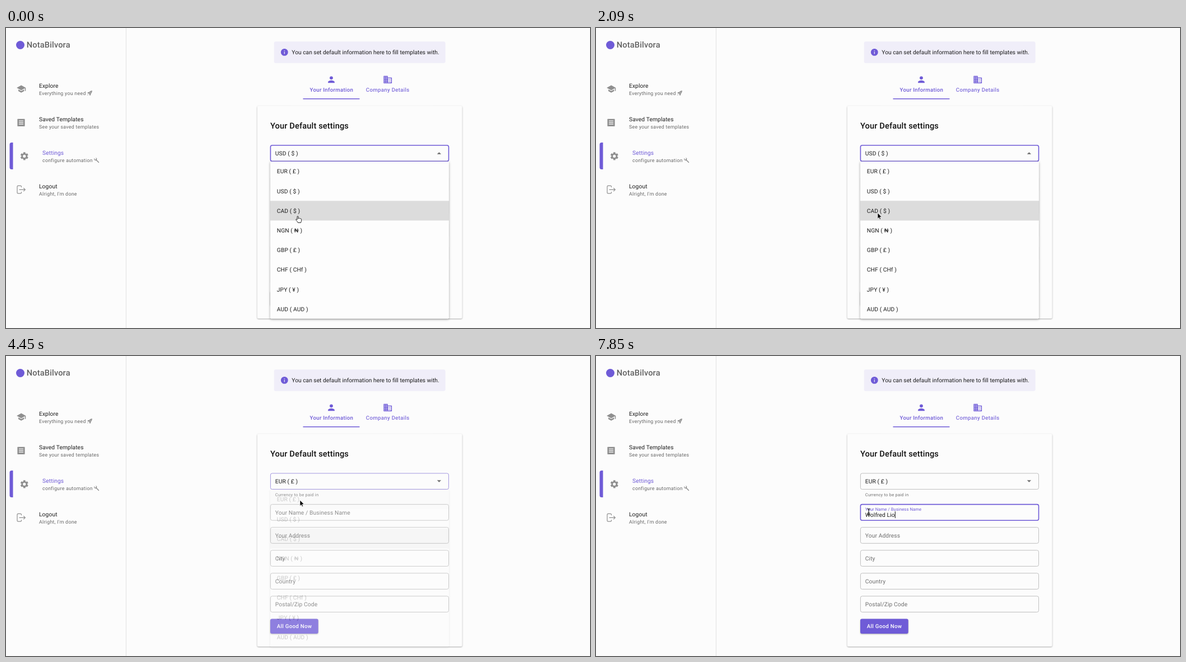
Animation of 1043 by 537 pixels, one loop 8000 ms. Source, as an HTML page:

```html
<!DOCTYPE html>
<html lang="en">
<head>
<meta charset="utf-8">
<title>Default settings</title>
<style>
  html, body { margin: 0; width: 100%; height: 100%; overflow: hidden; background: #fcfcfc; }
  svg { display: block; width: 100%; height: 100%; }
  text { font-family: Roboto, sans-serif; text-rendering: geometricPrecision; white-space: pre; }
  .sys text { font-family: Inter, sans-serif; }
  .card { filter: drop-shadow(0 1px 1.2px rgba(0,0,0,.32)); }
  .btn { filter: drop-shadow(0 1.2px 1.2px rgba(0,0,0,.3)); }
  .pop { filter: drop-shadow(0 1.5px 2px rgba(0,0,0,.34)); }
</style>
</head>
<body>
<svg id="stage" viewBox="0 0 1043 537"></svg>
<script>
const LOOP = 8000, TICK = 148.2;
const PURPLE = '#6f5bd7', INK = '#1c1c1c', GREY = '#6e6e6e', ICON = '#8f8f8f', PAPER = '#fcfcfc';
const ROW = 35.2, MENU_TOP = 239;

// Type styles: size, letter spacing, weight
const BODY = [10.27, .096, 400], NOTE = [8.8, .293, 400], BUTTON = [9.73, .278, 500],
      TITLE = [14.67, .11, 500], HELP = [7.5, .24, 400], INFO = [10.27, 0, 400],
      ENTRY = [9.3, 0, 600], ADDRESS = [8.8, 0, 400], MANAGE = [9.3, 0, 400];

const text = (x, y, str, [size, gap, weight], fill = INK, extra = '') =>
  `<text x="${x}" y="${y}" font-size="${size}" letter-spacing="${gap}" font-weight="${weight}" fill="${fill}" ${extra}>${str}</text>`;
const rect = (x, y, w, h, r, fill, extra = '') =>
  `<rect x="${x}" y="${y}" width="${w}" height="${h}" rx="${r}" fill="${fill}" ${extra}/>`;
const icon = (cx, cy, body, fill, scale = .733) =>
  `<g transform="translate(${cx} ${cy}) scale(${scale}) translate(-12 -12)" fill="${fill}">${body}</g>`;
const path = (d, extra = '') => `<path d="${d}" ${extra}/>`;
const field = (y, id = '') =>
  rect(472.4, y, 318.2, 28.6, 3, 'none', `stroke="#bfbfbf" ${id && `id="${id}"`}`);

const tooth = a => path('M12 2.4V21.6', `stroke="${ICON}" stroke-width="5" transform="rotate(${a} 12 12)"`);
const school = path('M5 13.18v4L12 21l7-3.82v-4L12 17l-7-3.82zM12 3L1 9l11 6 9-4.91V17h2V9L12 3z');
const sheet = path('M4 3h16a1 1 0 0 1 1 1v16a1 1 0 0 1-1 1H4a1 1 0 0 1-1-1V4a1 1 0 0 1 1-1z') +
  path('M6.5 8h11M6.5 12h11M6.5 16h11', `stroke="${PAPER}" stroke-width="1.7"`);
const gear = [0, 60, 120].map(tooth).join('') +
  `<circle cx="12" cy="12" r="7.2"/><circle cx="12" cy="12" r="3.5" fill="${PAPER}"/>`;
const person = path('M12 12a4 4 0 1 0 0-8 4 4 0 0 0 0 8zm0 2c-2.67 0-8 1.34-8 4v2h16v-2c0-2.66-5.33-4-8-4z');
const pane = (x, y) => `M${x} ${y}h2v2h-2z`;
const office = path('M12 7V3H2v18h20V7H12zM12 9h8v10h-8v-2h2v-2h-2v-2h2v-2h-2z' +
  [5, 9, 13, 17].map(y => pane(4, y) + pane(8, y)).join('') + pane(16, 11) + pane(16, 15), 'fill-rule="evenodd"');
const info = path('M12 2a10 10 0 1 0 0 20 10 10 0 0 0 0-20zM11 11h2v6h-2zM11 7h2v2h-2z', 'fill-rule="evenodd"');

function sidebar() {
  const item = (x, y, name, note, fill) => text(x, y, name, BODY, fill) + text(x, y + 13.3, note, NOTE, '#666');
  return path('M214.5 0V537', 'stroke="#e2e2e2"') +
    `<circle cx="25.5" cy="30.5" r="7.5" fill="${PURPLE}"/>` +
    text(36.8, 34.7, 'NotaBilvora', TITLE, '#626262') +
    icon(27.2, 109.2, school, ICON) + icon(27, 169.3, sheet, ICON) + icon(32.8, 229.4, gear, ICON) +
    path('M27.5 285.3V284q0-1.6-1.6-1.6H21.600q-1.600 0-1.600 1.600v10.600q0 1.600 1.600 1.600h4.300q1.600 0 1.600-1.600v-1.300M23.500 289.300h10.500M31.300 286.300l3 3-3 3',
      `fill="none" stroke="${ICON}" stroke-width="1.2"`) +
    path('M12.500 205V253H10Q6.500 253 6.500 249.500V208.500Q6.500 205 10 205z', `fill="${PURPLE}"`) +
    item(59, 106.500, 'Explore', 'Everything you need') +
    item(59, 166.600, 'Saved Templates', 'See your saved templates') +
    item(65, 226.700, 'Settings', 'configure automation', PURPLE) +
    item(59, 286.800, 'Logout', "Alright, I'm done") +
    path('M153.500 112.500q-4 .2-6 4l2.500 2.200q3.300-2.200 3.500-6.200zM147.700 115l-2 1.300 1.600.6zM151 118l-.8 2.700-1-1.600zM147 118.500l-1.300 2',
      'fill="#aaa" stroke="#777" stroke-width=".7"') +
    path('M160.500 235.500l5 5', 'stroke="#8a8a8a" stroke-width="1.4" stroke-linecap="round"') +
    path('M158.200 233.500a2 2 0 1 0 2.300-.8', 'fill="none" stroke="#8a8a8a" stroke-width="1.1"');
}

function page() {
  const labels = ['Your Address', 'City', 'Country', 'Postal/Zip Code'];
  return rect(478.7, 24.3, 306, 38.4, 3, '#f0eef9') + icon(497.3, 43.4, info, PURPLE, .64) +
    text(510.3, 47.1, 'You can set default information here to fill templates with.', INFO) +
    icon(581, 92.3, person, PURPLE) + icon(681.8, 92.3, office, PURPLE) +
    text(542.5, 113.8, 'Your Information', BUTTON, PURPLE) +
    text(642.8, 113.8, 'Company Details', BUTTON, '#8170dc') +
    rect(530.5, 126, 101, 1.5, 0, PURPLE) +
    rect(448.7, 139.2, 366, 380.8, 2.5, PAPER, 'class="card"') +
    text(472, 179.5, 'Your Default settings', TITLE, '#111') +
    field(210, 'selectBox') + text(480.8, 228, '', BODY, INK, 'id="value"') +
    path('', 'id="chevron" fill="#737373"') +
    text(480.8, 251.3, 'Currency to be paid in', HELP, GREY) +
    field(265.6, 'nameBox') + '<g id="label"></g>' +
    text(480.8, 288, '', BODY, INK, 'id="typed"') + rect(0, 278.2, 1, 12, 0, '#111', 'id="caret"') +
    labels.map((s, i) => field(306.7 + 41.05 * i) + text(480.8, 324.9 + 41.05 * i, s, BODY, GREY)).join('') +
    rect(472, 470.6, 85.7, 26.3, 3, PURPLE, 'class="btn"') + text(483.8, 487.2, 'All Good Now', BUTTON, '#fff');
}

function menu() {
  const items = ['EUR ( £ )', 'USD ( $ )', 'CAD ( $ )', 'NGN ( ₦ )', 'GBP ( £ )', 'CHF ( CHf )', 'JPY ( ¥ )', 'AUD ( AUD )'];
  return `<g id="menu">` + rect(472, MENU_TOP, 319, 281.5, 2, '#fdfdfd', 'class="pop"') +
    rect(472, 0, 319, ROW, 0, '#f5f5f5', 'id="hover"') +
    rect(472, MENU_TOP + 2 * ROW, 319, ROW, 0, '#ddd', 'id="chosen"') +
    items.map((s, i) => text(483.8, 260.3 + ROW * i, s, BODY)).join('') + '</g>';
}

function suggestions() {
  return `<g id="suggest" class="sys">` + rect(480.8, 295.5, 301.7, 126.7, 2, '#fdfdfd', 'class="pop"') +
    text(489.7, 318.2, 'TrivolettesIQ', ENTRY) +
    text(489.7, 333.4, 'B27, Sare Uno Street, Ivobe Estate , Tavuro, Vedos', ADDRESS) +
    text(489.7, 360.6, 'PlumeVortal', ENTRY) +
    text(489.7, 376, '48 Izonka Road, Ulemba, Nvorra, Ezulu', ADDRESS) +
    path('M481 392.500H782.500', 'stroke="#dcdcdc"') +
    text(489.7, 411.2, 'Manage addresses…', MANAGE) + '</g>';
}

const cursors = {
  hand: path('M-1 .8a1 1 0 0 1 2 0v3.600l.2-.5c.4-.7 1.700-.5 1.900.2.5-.6 1.600-.4 1.800.4.8-.4 1.700 0 1.700 1v2.300c0 1.500-1 2.300-1 3.700H.3C0 10-2.500 7.500-3.200 6.300c-.4-.8.6-1.500 1.400-.8l.8.8z',
    'fill="#fff" stroke="#111" stroke-width=".9"'),
  arrow: path('M0 0v10.500l2.400-2.300 1.500 3.500 1.700-.7-1.500-3.400h3.300z', 'fill="#000" stroke="#fff" stroke-width=".7"'),
  beam: path('M-2.500-5.500q2 0 2.500 1 .5-1 2.500-1M0-4.500v9M-2.500 5.500q2 0 2.500-1 .5 1 2.500 1M-1.300 1.800h2.600',
    'fill="none" stroke="#111" stroke-width="1.1"')
};

// Pointer stops: tick, x, y
const stops = [[0, 521, 337], [3, 524, 436], [5, 526, 470], [8, 525, 472], [10, 519, 390], [12, 508, 290],
  [14, 503, 331], [16, 503, 331], [19, 540, 272], [22, 550, 228], [24, 548, 229], [27, 528, 254],
  [30, 525, 258], [31, 525, 258], [36, 487, 279], [54, 487, 279]];
const shapes = [[0, 'hand'], [12, 'arrow'], [18, 'beam'], [20, 'hand'], [29, 'arrow'], [32, 'beam']];
const fades = [[0, 1], [16, .65], [17, .2], [18, 0], [24, .6], [25, 1], [29, .7], [30, .22], [31, 0]];
const typing = [[0, ''], [44, 'W'], [46, 'Wo'], [48, 'Wol'], [49, 'Wolfr'], [50, 'Wolfred '], [52, 'Wolfred L'], [53, 'Wolfred Lio']];

const at = (steps, n) => steps.filter(s => s[0] <= n).pop()[1];
function pointer(n) {
  const i = stops.findIndex(s => s[0] > n), [a, ax, ay] = stops[i - 1], [b, bx, by] = stops[i];
  const k = (n - a) / (b - a);
  return [ax + (bx - ax) * k, ay + (by - ay) * k];
}

const stage = document.getElementById('stage');
stage.innerHTML = sidebar() + page() + menu() + suggestions() + '<g id="cursor"></g>';
const el = {};
stage.querySelectorAll('[id]').forEach(e => el[e.id] = e);
const set = (e, attrs) => { for (const k in attrs) e.setAttribute(k, attrs[k]); };
const outline = (e, stroke, width = 1) => set(e, { stroke, 'stroke-width': width });

let shown = -1;
function draw(n) {
  const [x, y] = pointer(n), fade = at(fades, n);
  const open = n < 17 || (n >= 24 && n < 30);

  set(el.menu, { opacity: fade, display: fade ? 'inline' : 'none' });
  const row = Math.floor((y - MENU_TOP) / ROW);
  set(el.hover, { y: MENU_TOP + row * ROW, display: n > 5 && row >= 0 && row < 8 ? 'inline' : 'none' });
  set(el.chosen, { fill: row === 2 ? '#dcdcdc' : '#e3e3e3' });

  if (open) outline(el.selectBox, PURPLE, 1.6);
  else outline(el.selectBox, fade ? '#a498df' : n >= 20 && n < 24 ? '#777' : '#bfbfbf');
  set(el.chevron, { d: open ? 'M769.800 225.900h7.400l-3.700-3.700z' : 'M769.800 222.300h7.400l-3.700 3.700z' });
  el.value.textContent = n < 29 ? 'USD ( $ )' : 'EUR ( £ )';

  const focus = n >= 38, over = (n >= 18 && n < 21) || (n >= 32 && n < 38);
  outline(el.nameBox, focus ? PURPLE : over ? '#757575' : '#bfbfbf', focus ? 1.6 : 1);
  const lift = Math.min(1, Math.max(0, (n - 38) / 2)), size = 1 - .25 * lift;
  set(el.label, { transform: `translate(480.8 ${283.8 - 7.1 * lift}) scale(${size})` });
  el.label.innerHTML = text(0, 0, 'Your Name / Business Name', BODY, focus ? PURPLE : GREY);

  el.typed.textContent = at(typing, n);
  const width = el.typed.textContent ? el.typed.getComputedTextLength() : 0;
  set(el.caret, { x: 480.8 + width, display: n >= 39 && n !== 41 ? 'inline' : 'none' });
  set(el.suggest, { display: n >= 39 && n < 44 ? 'inline' : 'none' });

  el.cursor.innerHTML = cursors[at(shapes, n)];
  set(el.cursor, { transform: `translate(${x} ${y})` });
}

function loop() {
  const n = Math.min(53, Math.floor((performance.now() % LOOP + 5) / TICK));
  if (n !== shown) draw(shown = n);
  requestAnimationFrame(loop);
}
loop();
</script>
</body>
</html>
```
